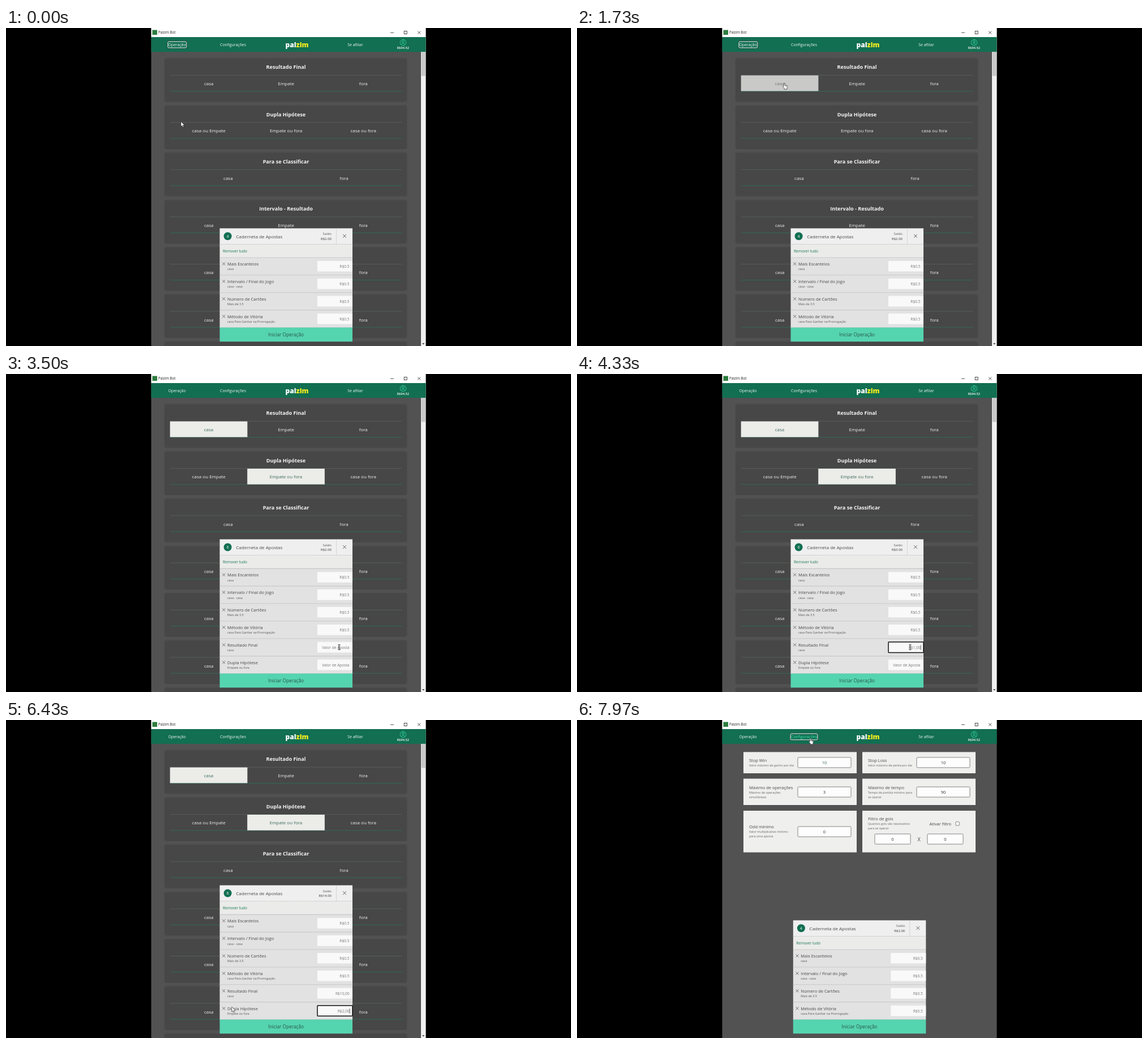
These frames come from a looping animation (998x561 px, 8 s). An HTML page:

```html
<!DOCTYPE html>
<html lang="pt">
<head>
<meta charset="utf-8">
<title>Palzim Bot</title>
<style>
  html, body { margin: 0; width: 100%; height: 100%; overflow: hidden; background: #000; }
  svg { display: block; width: 100vw; height: 100vh; }
  text { font-family: "Open Sans", "Noto Sans", sans-serif; }
  #cursor { animation: travel 8s ease-in-out infinite; }
  @keyframes travel {
    0%, 7.5% { transform: translate(309px, 165px); }
    18.75%, 24.4% { transform: translate(366.5px, 97px); }
    31.25%, 35% { transform: translate(480px, 178px); }
    43.1%, 71.9% { transform: translate(588.5px, 482px); }
    81.9%, 91.6% { transform: translate(389.5px, 507px); }
    96.9%, 100% { transform: translate(412.5px, 32px); }
  }
</style>
</head>
<body>
<svg id="stage" viewBox="0 0 998 561"></svg>
<script>
const LOOP = 8000, ROW = 30.9;
const GREEN = '#126f51', INK = '#484848';

const rect = (x, y, w, h, fill, more = '') =>
  `<rect x="${x}" y="${y}" width="${w}" height="${h}" fill="${fill}" ${more}/>`;
const line = (x1, y1, x2, y2, stroke, width = .8) =>
  `<path d="M${x1} ${y1}L${x2} ${y2}" stroke="${stroke}" stroke-width="${width}"/>`;
// y is the middle of the capitals
const text = (x, y, str, size, fill, more = '') =>
  `<text x="${x}" y="${y + size * .357}" font-size="${size}" fill="${fill}" ${more}>${str}</text>`;
const mid = (x, y, str, size, fill, more = '') =>
  text(x, y, str, size, fill, 'text-anchor="middle" ' + more);
const cross = (x, y, r, stroke) =>
  `<path d="M${x - r} ${y - r}l${2 * r} ${2 * r}m0 ${-2 * r}l${-2 * r} ${2 * r}" stroke="${stroke}" stroke-width=".8"/>`;
const group = (id, body) => `<g id="${id}">${body}</g>`;

function windowBar() {
  return rect(256.5, 0, 485, 16, '#fff') + rect(258.5, 3.5, 8.5, 8.5, '#2c7d3f') +
    text(269, 8, 'Palzim Bot', 6.2, '#222') +
    line(679, 8.2, 685, 8.2, '#222') + cross(729.7, 8, 2.5, '#222') +
    rect(703.2, 5.5, 5, 5, 'none', 'stroke="#222" stroke-width=".8"');
}

function focusRing(id, x, w) {
  return group(id, rect(x - .7, 23.2, w + 1.4, 12.6, 'none', 'rx="2" stroke="#0b2a20" stroke-width="1"') +
    rect(x, 24, w, 11, 'none', 'rx="1.5" stroke="#fff" stroke-width="1"'));
}

function header() {
  return rect(256.5, 16, 485, 26, GREEN) +
    mid(302, 30, 'Operação', 6.9, '#eef5f1') +
    mid(401, 30, 'Configurações', 6.9, '#eef5f1', 'id="configLink"') +
    mid(617, 30, 'Se afiliar', 6.9, '#eef5f1') +
    mid(514, 30, 'pal<tspan fill="#f8ee20">zim</tspan>', 12, '#fff', 'font-weight="800"') +
    `<g fill="none" stroke="#35d79d" stroke-width=".9"><circle cx="701.5" cy="25.5" r="5.3"/>
     <circle cx="701.5" cy="23.8" r="1.9"/><path d="M698 29.4q3.5-5 7 0"/></g>` +
    mid(701.3, 35.5, 'R$94.52', 5.6, '#fff', 'font-weight="600"') +
    focusRing('ringOperation', 285.8, 33) + focusRing('ringConfig', 377, 48);
}

function market(i, title, options) {
  const y = 54 + i * 83.3, step = 409.5 / options.length;
  return rect(281, y, 426, 74.5, '#464646', 'filter="url(#shade)"') +
    mid(494.5, y + 15, title, 9.1, '#f4f4f4', 'font-weight="700"') +
    line(290, y + 29.3, 699.5, y + 29.3, '#59655f') + line(290, y + 57.5, 699.5, y + 57.5, '#2c7260') +
    options.map((o, k) => mid(290 + step * (k + .5), y + 44.2, o, 8, '#f0f0f0')).join('');
}

function pickedCell(id, x, y, label) {
  return group(id, rect(x, y, 136.7, 27.7, '#ecece8') + mid(x + 68.3, y + 14.6, label, 8, '#37695e'));
}

function operationPage() {
  const three = ['casa', 'Empate', 'fora'];
  const markets = [
    ['Resultado Final', three],
    ['Dupla Hipótese', ['casa ou Empate', 'Empate ou fora', 'casa ou fora']],
    ['Para se Classificar', ['casa', 'fora']],
    ['Intervalo - Resultado', three], ['', three], ['', three], ['', three]
  ];
  return markets.map((m, i) => market(i, ...m)).join('') +
    pickedCell('cellHome', 289.7, 83.6, 'casa') + pickedCell('cellDraw', 426.2, 167, 'Empate ou fora') +
    rect(733, 16, 8.5, 545, '#f1f1f1') + rect(733.8, 25, 7, 59.5, '#c9c9c9') +
    '<path d="M735 22l2.2-2.4 2.2 2.4zM735 556l2.2 2.4 2.2-2.4z" fill="#444"/>';
}

function field(x, y, w, value, fill = '#333') {
  return rect(x, y, w, 18, '#fdfdfd', 'rx="1.5" stroke="#777" stroke-width=".9"') +
    mid(x + w / 2, y + 9.2, value, 7.6, fill);
}

function setting(x, y, h, textY, title, notes) {
  return rect(x, y, 200, h, '#efefed') + text(x + 10, textY, title, 7.5, INK) +
    notes.map((n, k) => text(x + 10, textY + 8.6 + k * 8, n, 5.4, '#666')).join('');
}

function configPage() {
  return setting(294, 56.5, 37.5, 71, 'Stop Win', ['Valor máximo de ganho por dia']) +
    setting(504, 56.5, 37.5, 71, 'Stop Loss', ['Valor máximo de perda por dia']) +
    setting(294, 103.5, 46.5, 119, 'Máximo de operações', ['Máximo de operações', 'simultâneas']) +
    setting(504, 103.5, 46.5, 119, 'Máximo de tempo', ['Tempo de partida mínimo para', 'se operar']) +
    setting(294, 160, 73.5, 188.7, 'Odd mínimo', ['Valor multiplicativo mínimo', 'para uma aposta']) +
    setting(504, 160, 73.5, 174.7, 'Filtro de gols', ['Quantos gols são necessários', 'para se operar']) +
    field(390, 66, 94, '10', '#37695e') + field(600, 66, 94, '10') +
    field(390, 118, 94, '3') + field(600, 118, 94, '90') + field(390, 188, 94, '0') +
    field(526, 201, 63, '0') + field(619, 201, 63, '0') +
    mid(604, 210.3, 'X', 9, INK) + text(622.5, 183, 'Ativar filtro', 7.5, INK) +
    rect(669, 179.7, 6.3, 6.3, '#fff', 'rx="1" stroke="#666" stroke-width=".8"');
}

function betRow(i, title, note) {
  const y = 405 + i * ROW;
  return group('row' + i, rect(377.5, y, 234.5, ROW + .2, '#e2e2e3') +
    line(377.5, y, 612, y, '#c3c3c3') + cross(384.7, y + 11, 2.6, '#555') +
    text(391, y + 11.2, title, 7.5, INK) + text(391, y + 20.5, note, 5.4, '#555') +
    rect(550, y + 6, 62, 18.6, '#f9f9fa', `id="input${i}" stroke-width="1.5" rx="1"`) +
    text(606.5, y + 15.6, 'R$0.5', 6.6, '#777', `id="value${i}" text-anchor="end"`) +
    group('caret' + i, line(607.2, y + 11.3, 607.2, y + 20, '#222', .7)));
}

function betSlip() {
  const bets = [
    ['Mais Escanteios', 'casa'], ['Intervalo / Final do Jogo', 'casa - casa'],
    ['Número de Cartões', 'Mais de 3.5'], ['Método de Vitória', 'casa Para Ganhar na Prorrogação'],
    ['Resultado Final', 'casa'], ['Dupla Hipótese', 'Empate ou fora']
  ];
  const top = rect(377.5, 353.4, 234.5, 28.2, '#efeff0') + rect(377.5, 381.5, 234.5, 23.6, '#ebebea') +
    line(377.5, 381.5, 612, 381.5, '#d5d5d5') + line(583.5, 353.4, 583.5, 381.5, '#cfcfcf') +
    `<circle cx="391.6" cy="367.3" r="7" fill="${GREEN}"/>` +
    mid(391.6, 367.4, '4', 6.6, '#fff', 'id="count"') +
    text(406.3, 367.7, 'Caderneta de Apostas', 8, INK) +
    text(575, 363.3, 'Saldo', 6, '#555', 'text-anchor="end"') +
    text(575, 371.4, '', 6, '#333', 'id="balance" text-anchor="end"') +
    cross(598, 367, 3, '#444') + text(383, 393.6, 'Remover tudo', 6.5, '#1b765a');
  return group('list', top + bets.map((b, i) => betRow(i, ...b)).join('')) +
    rect(377.5, 528.5, 234.5, 24.7, '#55d4b0') + mid(494.5, 541, 'Iniciar Operação', 8.25, '#28544a');
}

function pointer() {
  return group('arrow', '<path d="M0 0v9l2.1-1.9 1.4 3.2 1.5-.7-1.4-3.1h2.9z" fill="#fff" stroke="#111" stroke-width=".6"/>') +
    group('hand', `<path d="M-1 6V.8Q0-.7 1 .8V4l3.6 .8Q5.4 5 5.2 6.2L4.4 9v2H-.3V9.5L-2.8 6.4
      Q-2.8 5-1 6z" fill="#fff" stroke="#222" stroke-width=".7"/><path d="M2.3 4.4v1.8M3.8 4.8v1.6" stroke="#444" stroke-width=".5"/>`) +
    group('beam', '<path d="M-2-4.3h1.4L0-3.8.6-4.3H2M-2 4.3h1.4L0 3.8.6 4.3H2M0-3.8v7.6" fill="none" stroke="#111" stroke-width="1"/>');
}

document.getElementById('stage').innerHTML =
  `<defs><filter id="shade" x="-5%" y="-20%" width="110%" height="140%">
     <feDropShadow dx="0" dy=".5" stdDeviation="1.5" flood-opacity=".35"/></filter></defs>` +
  rect(256.5, 0, 485, 561, '#525252') + group('operation', operationPage()) + group('config', configPage()) +
  windowBar() + header() + group('slip', betSlip()) + group('cursor', pointer());

const $ = id => document.getElementById(id);
const show = (id, on) => { $(id).style.display = on ? '' : 'none'; };
const within = (t, a, b) => t >= a && t < b;
// last value whose time has come
const at = (t, steps) => steps.reduce((v, [start, next]) => t >= start ? next : v, steps[0][1]);

const shapes = [[0, 'arrow'], [1400, 'hand'], [2120, 'arrow'], [2330, 'hand'], [2930, 'arrow'],
  [3320, 'beam'], [5910, 'arrow'], [6480, 'hand'], [7400, 'arrow'], [7650, 'hand']];
const counts = [[0, 4], [1880, 5], [2650, 6], [6750, 5], [7300, 4]];
const typed = {
  4: [[0, 0], [3950, 1], [4090, 10], [4230, 100], [4480, 1000]],
  5: [[0, 0], [5100, 2], [5260, 20], [5430, 200]]
};
const focus = [[0, 0], [3600, 4], [4850, 5], [6750, 0]];

function paintCell(id, t, hover, leave) {
  show(id, t >= hover);
  const [box, label] = $(id).children, over = t < leave;
  box.setAttribute('fill', over ? '#c9c9c8' : '#ecece8');
  label.setAttribute('fill', over ? '#707472' : '#37695e');
}

function paint(t) {
  const shape = at(t, shapes), count = at(t, counts), focused = at(t, focus);
  const onConfig = t >= 7800;
  ['arrow', 'hand', 'beam'].forEach(s => show(s, s === shape));
  show('operation', !onConfig);
  show('config', onConfig);
  show('ringOperation', t < 1880);
  show('ringConfig', onConfig);
  $('configLink').setAttribute('fill', t >= 7650 ? '#3be0ac' : '#eef5f1');
  paintCell('cellHome', t, 1400, 2120);
  paintCell('cellDraw', t, 2330, 2930);

  $('slip').setAttribute('transform', `translate(${onConfig ? 4.3 : 0} 0)`);
  $('list').setAttribute('transform', `translate(0 ${(4 - count) * ROW})`);
  $('count').textContent = count;
  let cents = 200;
  for (let i = 0; i < 6; i++) {
    show('row' + i, i < count);
    const active = i > 3 && i === focused;
    $('input' + i).setAttribute('stroke', active ? '#111' : 'none');
    show('caret' + i, active && (t - (i === 4 ? 4480 : 5430) + 8000) % 1000 < 500);
    if (i < 4) continue;
    const amount = at(t, typed[i]);
    if (i < count) cents += amount;
    $('value' + i).textContent = amount ? 'R$' + (amount / 100).toFixed(2).replace('.', ',') : 'Valor de Aposta';
  }
  // keep the caret lit while digits are arriving
  if (within(t, 3950, 4480)) show('caret4', true);
  if (within(t, 5100, 5430)) show('caret5', true);
  $('balance').textContent = 'R$' + (cents / 100).toFixed(2);
}

let start;
function frame(now) {
  start ??= now;
  paint((now - start) % LOOP);
  requestAnimationFrame(frame);
}
paint(0);
requestAnimationFrame(frame);
</script>
</body>
</html>
```
